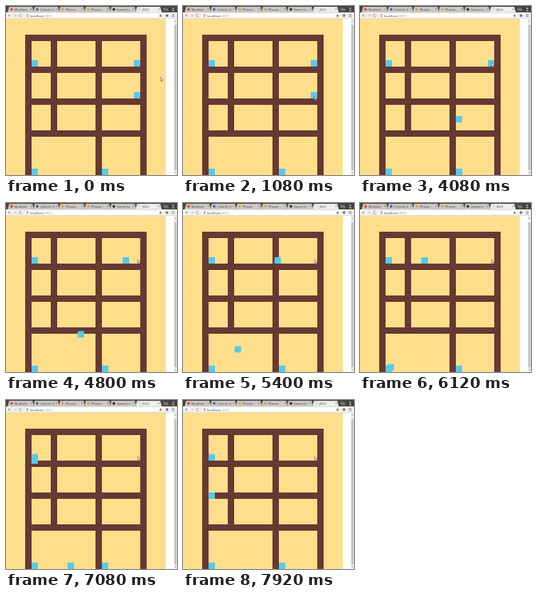
An HTML page that plays this animation: 214x212 px, repeating every 8000 ms.

```html
<!DOCTYPE html>
<html lang="en">
<head>
<meta charset="utf-8">
<title>Maze</title>
<style>
  html, body { margin: 0; width: 100%; height: 100%; overflow: hidden; background: #fff; }
  svg { display: block; width: 100%; height: 100%; }
  text { font: 4.2px "Open Sans", sans-serif; fill: #45423f; }
  .block { fill: #59c9e8; }
  .wall { fill: none; stroke: #673933; stroke-width: 8; }
  .line { fill: none; stroke: #77736f; stroke-width: .6; }
</style>
</head>
<body>
<svg viewBox="0 0 214 212">
  <rect y="16" width="200" height="196" fill="#fddf8b"/>
  <path class="wall" d="M24 40H176M28 80H172M28 120H172M28 160H172M28 40V212M172 40V212M60 40V160M116 40V212"/>
  <g id="blocks"></g>

  <rect x="210" y="16" width="4" height="196" fill="#eeedeb"/>
  <rect x="210.7" y="24" width="2.7" height="182" fill="#c3c1bf"/>
  <path d="M211 19.5l1-1.3 1 1.3zM211 208.7l1 1.3 1-1.3z" fill="#77736f"/>

  <rect width="214" height="8" fill="#45433f"/>
  <g id="tabs"></g>
  <path d="M196 2.5h6l2 4h-6z" fill="#777470"/>
  <circle cx="209.3" cy="3" r="1.1" fill="#c9c6c2"/>
  <path d="M207.3 6.5q2-3 4 0z" fill="#c9c6c2"/>

  <rect y="8" width="214" height="8" fill="#f1f0ee"/>
  <rect x="23" y="9" width="174" height="6" rx="1" fill="#fff" stroke="#d0cecb" stroke-width=".4"/>
  <path class="line" d="M6 12H3m1.3-1.3L3 12l1.3 1.3M19.6 11a1.7 1.7 0 1 0 .2 1.7"/>
  <path class="line" stroke-opacity=".5" d="M10 12h3m-1.3-1.3L13 12l-1.3 1.3"/>
  <path class="line" d="M26 10.5h1.6v3H26z"/>
  <text x="30" y="13.6">localhost<tspan fill="#9a9794">:9001</tspan></text>
  <path d="M193.5 10l.6 1.4 1.5.1-1.2 1 .4 1.5-1.3-.8-1.3.8.4-1.5-1.2-1 1.5-.1z" fill="#77736f"/>
  <circle cx="201.5" cy="12" r="1.7" fill="#777"/>
  <path class="line" d="M207.5 10.7h3.6M207.5 12h3.6M207.5 13.3h3.6"/>
  <path d="M0 15.8H214" stroke="#c9c7c4" stroke-width=".4"/>

  <path id="cursor" d="M.3.3V5L1.4 4 2.2 5.8 3 5.4 2.3 3.7H3.6z" fill="#f4f2ef" stroke="#4b4947" stroke-width=".5"/>
</svg>
<script>
const LOOP = 8000, STEP = 120, SPEED = 0.0523;
const NS = "http://www.w3.org/2000/svg";
const $ = id => document.getElementById(id);

function add(parent, tag, attrs, text) {
  const el = document.createElementNS(NS, tag);
  for (const key in attrs) el.setAttribute(key, attrs[key]);
  if (text) el.textContent = text;
  return parent.appendChild(el);
}

const tabs = [
  ["Mudlark", "#e0472f"], ["Calmfo G", "#4267ad"], ["Phaser -", "#d9a441"],
  ["Phaser -", "#d9a441"], ["Game lo", "#333"], ["JX24", "#eee"]
];
tabs.forEach(([title, color], i) => {
  const x = 3 + i * 32, active = i === tabs.length - 1;
  add($("tabs"), "path", {
    d: `M${x - 1} 8l2-7h29l2 7z`, fill: active ? "#f1f0ee" : "#cecbc7",
    stroke: "#8d8a86", "stroke-width": 0.3
  });
  add($("tabs"), "circle", { cx: x + 4, cy: 4.2, r: 1.7, fill: color, stroke: "#999", "stroke-width": active ? 0.3 : 0 });
  add($("tabs"), "text", { x: x + 7.5, y: 5.7 }, title);
  add($("tabs"), "path", { class: "line", d: `M${x + 27.5} 3.2l2 2m0-2l-2 2` });
});

function block(x, y) {
  return add($("blocks"), "rect", { class: "block", x, y, width: 8, height: 8 });
}
[[32, 68], [32, 204], [120, 204]].forEach(p => block(...p));

// Each walker waits at its first point, then follows its legs at constant speed.
const walkers = [
  { legs: [{ start: 3120, from: [160, 108], to: [32, 204] },
           { start: 6220, from: [32, 204], to: [120, 204] }] },
  { legs: [{ start: 4532, from: [160, 68], to: [32, 68] },
           { start: 7002, from: [31.8, 68], to: [31.8, 156] }] }
];
walkers.forEach(w => w.el = block(...w.legs[0].from));

const mix = (a, b, k) => a + (b - a) * k;
const clamp = k => Math.min(1, Math.max(0, k));

function walk({ el, legs }, t) {
  const { start, from, to } = t >= legs[1].start ? legs[1] : legs[0];
  const length = Math.hypot(to[0] - from[0], to[1] - from[1]);
  const k = clamp((t - start) * SPEED / length);
  el.setAttribute("x", mix(from[0], to[0], k));
  el.setAttribute("y", mix(from[1], to[1], k));
}

function cursorAt(t) {
  if (t < 960) {
    const k = clamp(t / 840), e = k * k * (3 - 2 * k);
    return [mix(193, 164, e), mix(89, 114, e)];
  }
  const k = clamp((t - 3240) / 720), e = k * k * (3 - 2 * k);
  return [164 + 0.5 * e + 7 * Math.sin(Math.PI * e), mix(112.7, 70.5, e)];
}

function draw(now) {
  const t = Math.floor(now % LOOP / STEP) * STEP;
  walkers.forEach(w => walk(w, t));
  $("cursor").setAttribute("transform", `translate(${cursorAt(t)})`);
}

let origin;
function tick(now) {
  origin ??= now;
  draw(now - origin);
  requestAnimationFrame(tick);
}
draw(0);
requestAnimationFrame(tick);
</script>
</body>
</html>
```
